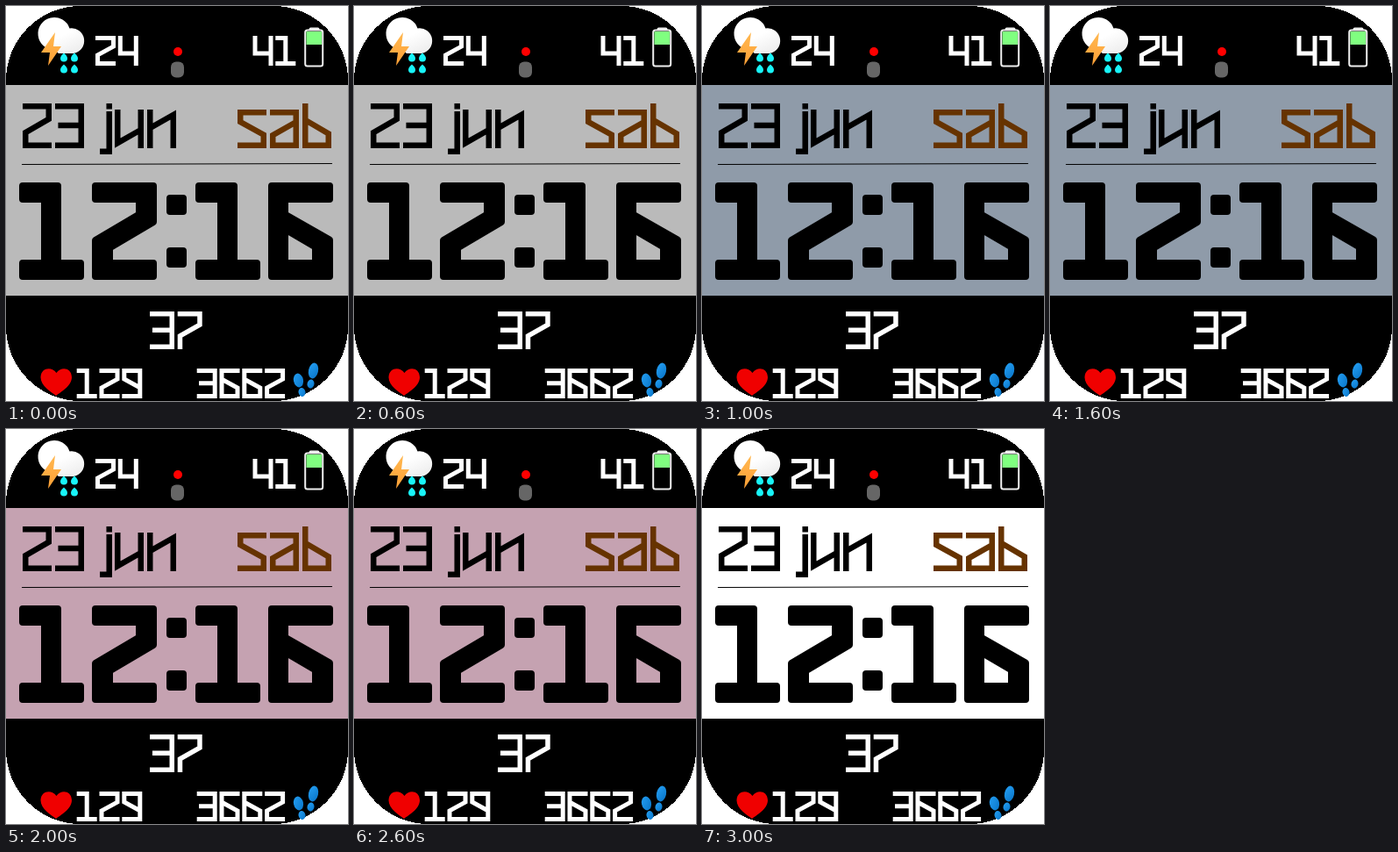
These frames come from a looping animation (390x450 px, 4000 ms). An HTML page:

```html
<!DOCTYPE html>
<html lang="it">
<head>
<meta charset="utf-8">
<title>Watch face</title>
<style>
html, body { margin: 0; width: 100%; height: 100%; overflow: hidden; background: #fff; }
svg { display: block; width: 390px; height: 450px; }
#panel { animation: tint 4s step-end infinite; }
@keyframes tint {
  0% { fill: #bababa; }
  25% { fill: #8f9ba9; }
  50% { fill: #c5a2b1; }
  75%, 100% { fill: #fff; }
}
.thin path { fill: none; stroke-linecap: square; stroke-linejoin: miter; }
.bold { stroke: #000; stroke-width: 8; stroke-linejoin: round; }
</style>
</head>
<body>
<svg viewBox="0 0 390 450">
  <defs>
    <linearGradient id="cloud" x1="0" y1="0" x2=".6" y2="1">
      <stop offset=".6" stop-color="#fff"/><stop offset="1" stop-color="#f0f0f0"/>
    </linearGradient>
    <linearGradient id="bolt" x1="0" y1="0" x2="0" y2="1">
      <stop offset="0" stop-color="#ffb850"/><stop offset="1" stop-color="#ffa035"/>
    </linearGradient>
    <linearGradient id="foot" x1="0" y1="0" x2="1" y2="1">
      <stop offset="0" stop-color="#25a0f4"/><stop offset="1" stop-color="#0874c8"/>
    </linearGradient>
    <path id="one" d="M19 205H59V293H85V308H19V293H44V220H19Z"/>
  </defs>

  <rect width="390" height="450" rx="85" shape-rendering="crispEdges"/>
  <rect id="panel" y="90" width="390" height="240"/>

  <!-- weather -->
  <path fill="url(#cloud)" d="M55 50A18.500 18.500 0 1 1 72.500 25.500A14.300 14.300 0 1 1 77 54H60Z"/>
  <path fill="url(#bolt)" d="M56 30L40 53H50L48 68L63 46H54Z"/>
  <g fill="#18f4f8">
    <path id="drop" d="M66 53.500Q70 57 70 59.500A4 4 0 0 1 62 59.500Q62 57 66 53.500Z"/>
    <use href="#drop" x="12"/><use href="#drop" y="13"/><use href="#drop" x="12" y="13"/>
  </g>

  <!-- status -->
  <circle cx="196" cy="52" r="5" fill="#f00"/>
  <rect x="188" y="63.500" width="15" height="18" rx="6" fill="#666"/>

  <!-- battery -->
  <rect x="345.500" y="24.500" width="12" height="5" rx="2" fill="#eee"/>
  <rect x="341.200" y="27.500" width="20" height="41" rx="2.500" stroke="#eee" stroke-width="2"/>
  <rect x="342.500" y="29" width="17.500" height="15" fill="#80ff80"/>

  <path d="M18 180.500L372 179.500" stroke="#000"/>

  <g class="bold" role="img" aria-label="12:16">
    <use href="#one"/>
    <path d="M102 205H168V246L118 275.500V293H168V308H102V267L152 237.500V220H102Z"/>
    <path d="M187 219H202V234H187ZM187 279H202V294H187Z"/>
    <use href="#one" x="201"/>
    <path fill-rule="evenodd" d="M303 205H369V220H318V237.500L369 266.500V308H303ZM318 254V293H353V274.500Z"/>
  </g>

  <!-- pulse -->
  <path fill="#f00000" d="M57 444C52 440 39.500 433 39.500 423C40 411 53 411 57.500 418C62 411 74.500 411 75 423C75 433 62 440 57 444Z"/>

  <!-- steps -->
  <g fill="url(#foot)">
    <ellipse cx="333.500" cy="426.500" rx="5.500" ry="8" transform="rotate(-12 333.500 426.500)"/>
    <ellipse cx="337.500" cy="440" rx="4" ry="5" transform="rotate(-12 337.500 440)"/>
    <ellipse cx="350.500" cy="415.500" rx="5.500" ry="9" transform="rotate(12 350.500 415.500)"/>
    <ellipse cx="347.500" cy="430.500" rx="4" ry="5" transform="rotate(12 347.500 430.500)"/>
  </g>
  <g id="labels" class="thin"></g>
</svg>
<script>
// Stroke centre lines in a unit box; y = .16 is the top of small letters.
const glyphs = {
  1: 'M0 0 .5 0 .5 1M0 1 1 1',
  2: 'M0 0 1 0 1 .33 0 .67 0 1 1 1',
  3: 'M0 0 1 0 1 1 0 1M.13 .49 1 .49',
  4: 'M0 0 0 .6 1 .6M1 0 1 1',
  6: 'M1 0 0 0 0 1 1 1 1 .67 .08 .36',
  7: 'M0 0 1 0 1 .33 0 .67 0 1',
  9: 'M0 1 1 1 1 0 0 0 0 .33 .92 .64',
  j: 'M.64 0 .64 0M.64 .2 .64 1.16 .36 1.16',
  u: 'M0 .16 0 .94 .92 .63M1 .16 1 1',
  n: 'M0 .16 0 1M.08 .53 1 .22 1 1',
  s: 'M1 .16 0 .16 0 .4 1 .73 1 1 0 1',
  a: 'M0 .16 1 .16 1 1 0 1 0 .74 .92 .43',
  b: 'M0 0 0 1 1 1 1 .7 .08 .38'
};

const labels = document.getElementById('labels');
const make = (tag, attrs, parent) => {
  const el = document.createElementNS('http://www.w3.org/2000/svg', tag);
  for (const key in attrs) el.setAttribute(key, attrs[key]);
  return parent.appendChild(el);
};

function write(text, x, y, w, h, step, weight, color) {
  const group = make('g', { role: 'img', 'aria-label': text, stroke: color, 'stroke-width': weight }, labels);
  [...text].forEach((char, i) => {
    let horizontal = true;
    const d = glyphs[char].replace(/[\d.]+/g, n => {
      const v = horizontal
        ? x + i * step + weight / 2 + n * (w - weight)
        : y + weight / 2 + n * (h - weight);
      horizontal = !horizontal;
      return v.toFixed(2);
    });
    make('path', { d }, group);
  });
}

const small = (text, x, y) => write(text, x, y, 23, 34, 25.8, 5, '#fff');
const date = (text, x, color) => write(text, x, 111, 33, 51, 37, 6.5, color);

small('24', 102, 34);
small('41', 281.5, 34);
small('129', 80.7, 413);
small('3662', 217.7, 413);
write('37', 164, 348, 28, 43, 31.7, 5.5, '#fff');
date('23', 19, '#000');
date('j', 97.5, '#000');
date('un', 124, '#000');
date('sab', 264, '#630');
</script>
</body>
</html>
```
